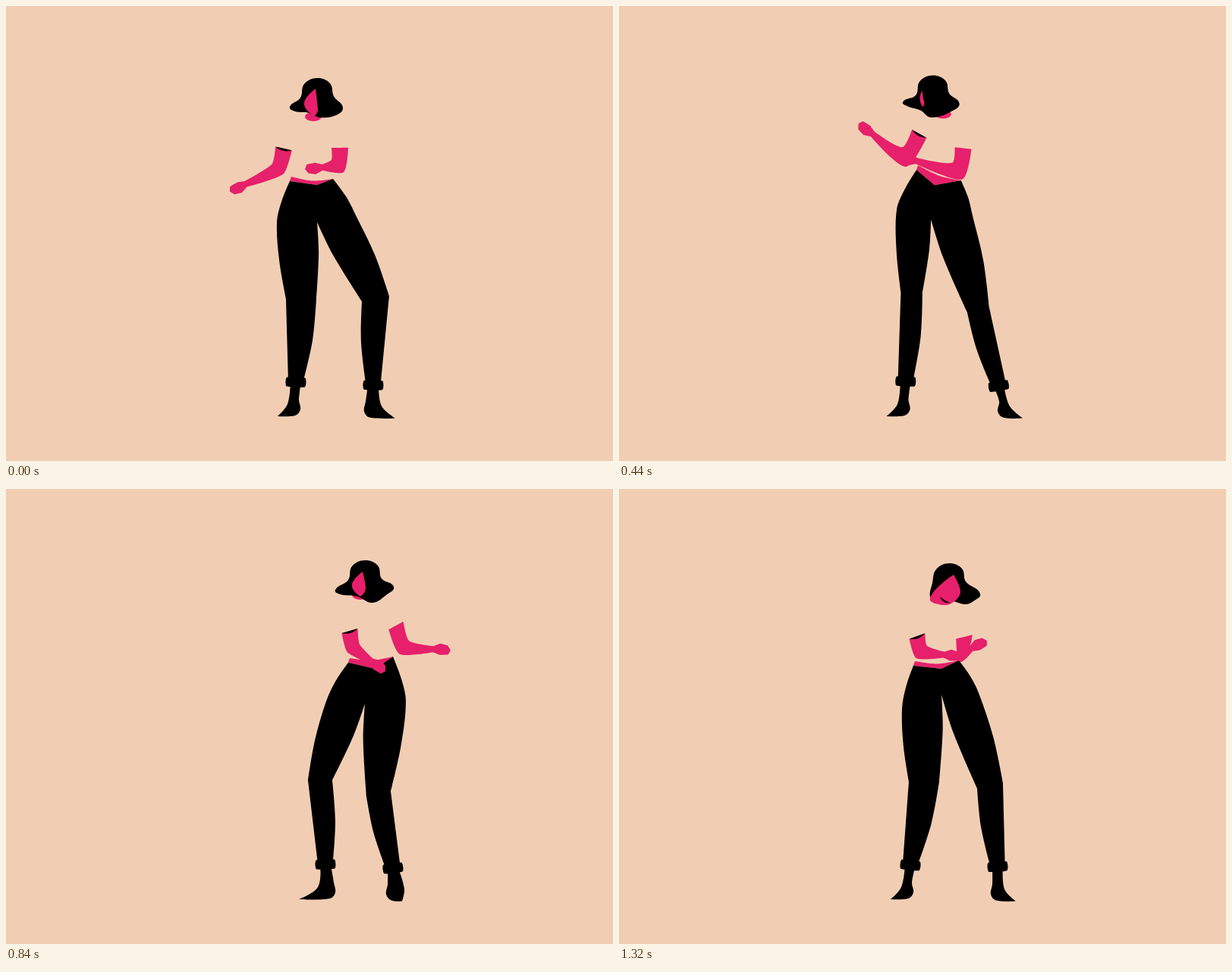
An HTML page that plays this animation: 800 px wide and 600 px high, repeating every 1.36 s.

```html
<!DOCTYPE html>
<html lang="en">
<head>
<meta charset="utf-8">
<title>Dancer</title>
<style>
  html, body { margin: 0; width: 100%; height: 100%; overflow: hidden; background: #f1ceb3; }
  svg { display: block; width: 100%; height: 100%; }
  .skin { fill: #e6206a; }
</style>
</head>
<body>
<svg id="stage" viewBox="0 0 800 600"></svg>
<script>
const LOOP = 1360, STEP = 40, LEFT = -1, RIGHT = 1;
const poses = [];
const pose = (time, joints) => poses.push({ time, ...joints });

// Joints as x, y pairs:
//   waist: left, dip, right, crotch     leg: hip, knee, half knee width, cuff
//   foot: x of heel, instep, toe        arm: shoulder, elbow, hand
//   hair: top, right lobe, bottom, left lobe     face: tip, cheek, chin, temple
pose(0, {
  waist: [374,231, 410,236, 431,228, 410,285],
  legL: [357,285, 389,386, 20, 382,496], legR: [462,278, 487,386, 18, 484,500],
  footL: [388, 371, 358], footR: [472, 495, 513],
  armL: [366,188, 358,215, 305,240], armR: [440,187, 437,211, 405,214],
  hair: [410,95, 444,134, 414,147, 374,133], face: [408,109, 393,128, 405,145, 411,136], neck: [405,146]
});
pose(200, {
  waist: [371,219, 406,235, 432,223, 405,283],
  legL: [350,270, 383,380, 18, 380,496], legR: [462,277, 478,391, 16, 489,501],
  footL: [386, 372, 358], footR: [484, 502, 520],
  armL: [368,171, 353,200, 295,167], armR: [438,185, 431,212, 370,205],
  hair: [396,89, 413,137, 390,143, 357,134], face: [394,96, 380,110, 378,126, 390,112], neck: [409,137]
});
pose(360, {
  waist: [380,212, 404,235, 438,226, 401,264],
  legL: [353,265, 378,376, 13, 376,495], legR: [459,270, 475,394, 15, 498,501],
  footL: [382, 367, 353], footR: [495, 510, 534],
  armL: [385,162, 363,190, 317,146], armR: [443,182, 434,210, 374,180],
  hair: [403,86, 439,122, 400,141, 360,118], face: [389,106, 387,114, 389,122, 391,114], neck: [417,137]
});
pose(560, {
  waist: [413,224, 440,238, 473,234, 432,310],
  legL: [389,275, 400,382, 17, 385,495], legR: [481,283, 473,408, 14, 503,501],
  footL: [391, 372, 356], footR: [503, 521, 526],
  armL: [413,181, 399,215, 338,208], armR: [473,195, 469,228, 411,255],
  hair: [432,100, 463,140, 432,156, 399,142], face: [422,117, 414,131, 420,149, 422,135], neck: [443,150]
});
pose(840, {
  waist: [451,229, 487,237, 510,221, 473,283],
  legL: [422,280, 414,384, 16, 421,495], legR: [527,280, 491,402, 16, 510,500],
  footL: [434, 411, 386], footR: [501, 525, 522],
  armL: [453,187, 458,210, 491,234], armR: [514,180, 525,209, 575,212],
  hair: [473,94, 511,129, 483,150, 434,133], face: [470,109, 456,126, 466,141, 474,129], neck: [467,140]
});
pose(1120, {
  waist: [418,235, 454,242, 484,224, 457,277],
  legL: [406,280, 412,385, 18, 391,496], legR: [505,267, 503,392, 19, 513,497],
  footL: [397, 377, 362], footR: [507, 522, 526],
  armL: [430,190, 437,214, 503,193], armR: [496,187, 503,205, 536,160],
  hair: [463,98, 507,132, 486,151, 430,138], face: [468,107, 441,142, 460,150, 479,131], neck: [460,145]
});
pose(1320, {
  waist: [388,233, 425,237, 448,226, 425,271],
  legL: [373,290, 402,386, 20, 384,496], legR: [474,269, 489,391, 17, 499,498],
  footL: [388, 372, 358], footR: [490, 508, 523],
  armL: [393,194, 399,215, 440,220], armR: [455,195, 457,214, 475,205],
  hair: [435,98, 476,138, 456,152, 410,142], face: [441,113, 410,144, 428,153, 450,135], neck: [428,147]
});

const pairs = list => {
  const out = [];
  for (let i = 0; i < list.length; i += 2) out.push([list[i], list[i + 1]]);
  return out;
};
const add = (p, x, y) => [p[0] + x, p[1] + y];
const polar = (p, angle, r) => add(p, r * Math.cos(angle), r * Math.sin(angle));
const heading = (a, b) => Math.atan2(b[1] - a[1], b[0] - a[0]);
const place = (p, [x, y], angle) => polar(polar(p, angle, x), angle + Math.PI / 2, y);
// Point between a and b, pushed sideways by k of their distance.
const bulge = (a, b, t, k) => {
  const dx = b[0] - a[0], dy = b[1] - a[1];
  return add(a, dx * t - dy * k, dy * t + dx * k);
};

// The hand becomes angle and reach from the elbow, so that the forearm swings.
for (const arm of ["armL", "armR"]) {
  let last = Math.PI;
  for (const p of poses) {
    const [shoulder, elbow, hand] = pairs(p[arm]);
    const angle = heading(elbow, hand);
    last = angle + 2 * Math.PI * Math.round((last - angle) / (2 * Math.PI));
    p[arm] = [...shoulder, ...elbow, last, Math.hypot(hand[0] - elbow[0], hand[1] - elbow[1])];
  }
}

// Smooth curve through the key poses, open at both ends.
function at(part, time) {
  let i = 0;
  while (i < poses.length - 2 && time >= poses[i + 1].time) i++;
  const a = poses[i], b = poses[i + 1], before = poses[i - 1] || a, after = poses[i + 2] || b;
  const span = b.time - a.time, u = (time - a.time) / span, u2 = u * u, u3 = u2 * u;
  return a[part].map((v, k) => {
    const w = b[part][k];
    const m = (w - before[part][k]) / (b.time - before.time) * span;
    const n = (after[part][k] - v) / (after.time - a.time) * span;
    return (2 * u3 - 3 * u2 + 1) * v + (u3 - 2 * u2 + u) * m + (3 * u2 - 2 * u3) * w + (u3 - u2) * n;
  });
}

// Closed outline; "s" marks a smooth point, "c" a corner.
function outline(pts, kinds, pull = 0.34) {
  const n = pts.length;
  const handle = (i, side, length) => {
    const p = pts[i];
    if (kinds[i % kinds.length] !== "s") return p;
    return polar(p, heading(pts[(i + n - 1) % n], pts[(i + 1) % n]), side * pull * length);
  };
  const put = p => p[0].toFixed(2) + " " + p[1].toFixed(2);
  let d = "M" + put(pts[0]);
  for (let i = 0; i < n; i++) {
    const j = (i + 1) % n, length = Math.hypot(pts[j][0] - pts[i][0], pts[j][1] - pts[i][1]);
    d += "C" + [handle(i, 1, length), handle(j, -1, length), pts[j]].map(put).join(" ");
  }
  return d + "Z";
}
const crescent = (a, b, sag, top) =>
  `M${a}Q${bulge(a, b, 0.5, sag)} ${b}Q${bulge(a, b, 0.5, top)} ${a}Z`;

const stage = document.getElementById("stage");
const shape = {};
for (const name of ["belly", "footL", "footR", "pants", "cuffL", "cuffR",
  "armR", "armL", "sleeve", "neck", "hair", "face", "mouth"]) {
  const el = document.createElementNS("http://www.w3.org/2000/svg", "path");
  if (/belly|arm|neck|face/.test(name)) el.setAttribute("class", "skin");
  shape[name] = stage.appendChild(el);
}
const draw = (name, d) => shape[name].setAttribute("d", d);

// One half of the trousers from the waist down to the cuff and up to the crotch.
const HALF = "cssscccscs";
function leg(joints, side, waist, crotch) {
  const [hx, hy, kx, ky, half, cx, cy] = joints;
  const hip = [hx, hy], knee = [kx, ky], cuff = [cx, cy];
  const tilt = 0.6 * (heading(knee, cuff) - Math.PI / 2);
  const drop = side === RIGHT ? 3.5 : 0;
  const outer = add(knee, side * half, -drop), inner = add(knee, -side * half, drop);
  const ankleOut = place(cuff, [side * 10, -3], tilt), ankleIn = place(cuff, [-side * 10, -3], tilt);
  return {
    cuff, tilt,
    pts: [waist, bulge(waist, hip, 0.5, -side * 0.04), hip, bulge(hip, outer, 0.5, -side * 0.028), outer,
      ankleOut, ankleIn, bulge(inner, ankleIn, 0.5, side * 0.033), inner, bulge(crotch, inner, 0.4, side * 0.025)]
  };
}

function foot([heel, instep, toe], cuff, dir, ground) {
  return outline([add(cuff, dir * 7, 0), add(cuff, -dir * 7, 0), [heel + dir * 2, ground - 22],
    [heel, ground - 9], [heel + dir * 7, ground - 1], [toe, ground], [instep, ground - 16]], "ccssscs");
}

function cuffBand(cuff, tilt) {
  const corners = [[-12, -6], [12, -6], [13.5, 0], [12, 6], [-12, 6], [-13.5, 0]];
  return outline(corners.map(p => place(cuff, p, tilt)), "s", 0.2);
}

const HAND = [[-12, 4], [-3, 7], [8, 6], [11, 0], [7, -6], [-3, -8], [-12, -4]];
function arm([sx, sy, ex, ey, angle, reach], lean) {
  const shoulder = [sx, sy], elbow = [ex, ey], upper = heading(shoulder, elbow);
  const across = upper + Math.PI / 2 + lean;
  const miter = (upper + angle) / 2 + Math.PI / 2;
  const width = 9 / Math.max(0.5, Math.cos((angle - upper) / 2));
  const hand = polar(elbow, angle, reach);
  return [polar(shoulder, across, 11), polar(elbow, miter, width),
    ...HAND.map(p => place(hand, p, angle)),
    polar(elbow, miter, -width), polar(shoulder, across, -11)];
}

function hairPoints([top, right, bottom, left]) {
  const curl = add(left, 7, 6);
  return [top, add(top, 17, 7), add(top, 22, 24), right, add(right, -9, 10), bottom,
    bulge(curl, bottom, 0.5, -0.07), curl, left, add(top, -22, 26), add(top, -17, 8)];
}

function drawLegs(time) {
  const [left, dip, right, crotch] = pairs(at("waist", time));
  const l = leg(at("legL", time), LEFT, left, crotch), r = leg(at("legR", time), RIGHT, right, crotch);
  draw("pants", outline([...l.pts, crotch, ...r.pts.reverse(), dip], HALF + "c" + [...HALF].reverse().join("") + "c"));
  draw("cuffL", cuffBand(l.cuff, l.tilt));
  draw("cuffR", cuffBand(r.cuff, r.tilt));
  draw("footL", foot(at("footL", time), l.cuff, LEFT, 541));
  draw("footR", foot(at("footR", time), r.cuff, RIGHT, 543.5));
  const hem = add(left, 2, -6);
  draw("belly", outline([hem, add(bulge(hem, right, 0.5, 0), 0, 4), right, dip, left], "csccc"));
}

function drawArms(time) {
  const l = arm(at("armL", time), -0.07), r = arm(at("armR", time), -0.14);
  const kinds = "cscccccccsc";
  draw("armL", outline(l, kinds, 0.2));
  draw("armR", outline(r, kinds, 0.2));
  draw("sleeve", crescent(l[0], l[l.length - 1], 0.28, 0));
}

function drawHead(time) {
  draw("hair", outline(hairPoints(pairs(at("hair", time))), "s", 0.38));
  const [tip, cheek, chin, temple] = pairs(at("face", time));
  draw("face", outline([tip, cheek, chin, bulge(chin, temple, 0.5, 0.18), temple], "cssss"));
  const [x, y] = at("neck", time);
  draw("neck", `M${x - 11} ${y}a11 6 0 1 0 22 0a11 6 0 1 0 -22 0Z`);
  // The smile opens as the face turns to the front.
  const smile = Math.max(0, (temple[0] - cheek[0] - 18) / 22);
  draw("mouth", crescent(add(chin, -5 * smile, -3 - 8 * smile), add(chin, 8 * smile, -3), 0.4 * smile, 0.1));
  shape.mouth.style.display = smile ? "" : "none";
}

const start = performance.now();
function tick() {
  const time = Math.floor((performance.now() - start) % LOOP / STEP) * STEP;
  drawLegs(time);
  drawArms(time);
  drawHead(time);
  requestAnimationFrame(tick);
}
tick();
</script>
</body>
</html>
```
